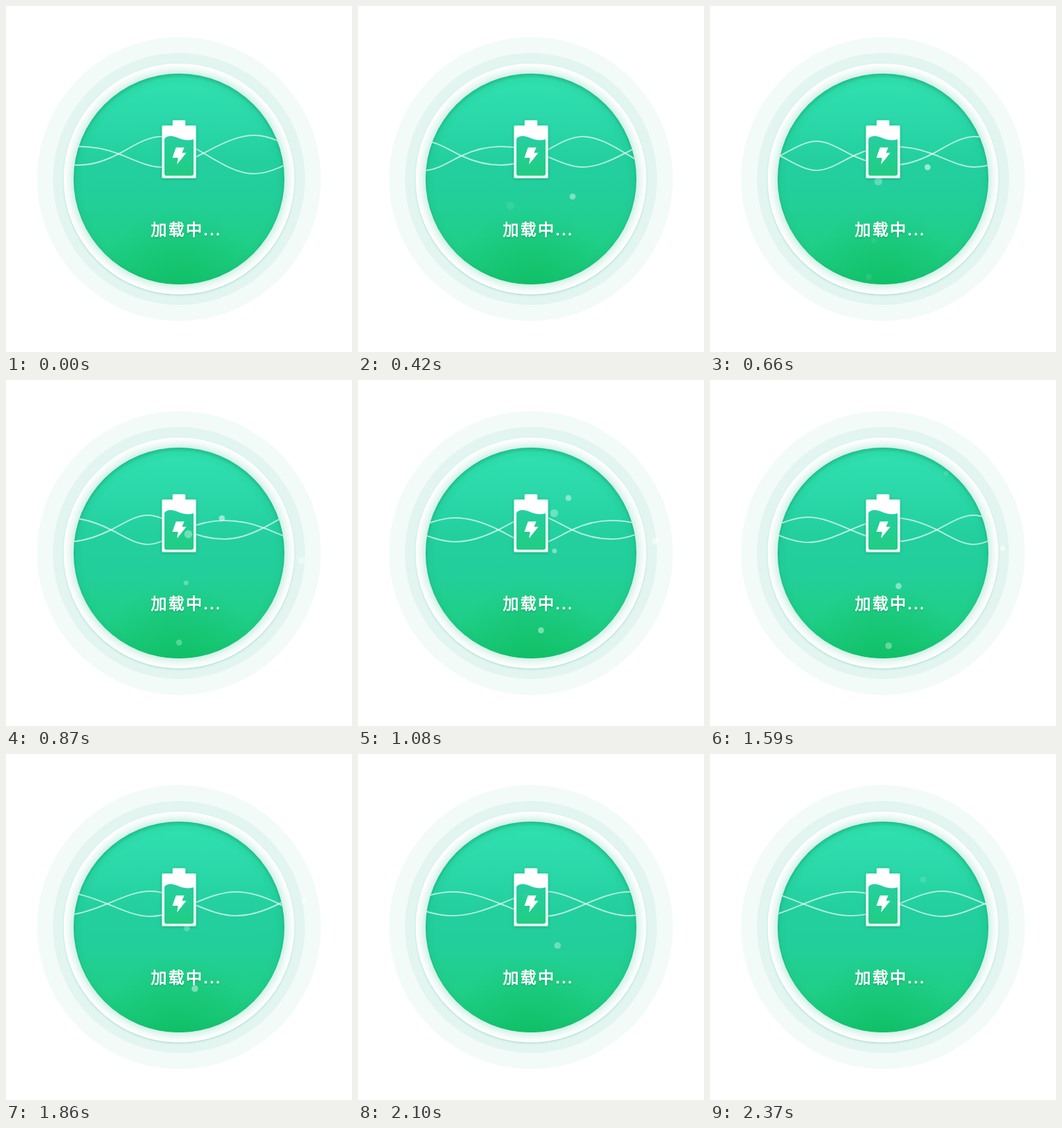
Animation of 522x522 px, one loop 2400 ms. Source, as an HTML page with a canvas:

```html
<!DOCTYPE html>
<html lang="zh">
<head>
<meta charset="utf-8">
<style>
  html, body { margin: 0; width: 100%; height: 100%; overflow: hidden; background: #fff; }
  canvas { display: block; width: 522px; height: 522px; }
</style>
</head>
<body>
<canvas id="stage" width="522" height="522"></canvas>
<script>
const ctx = document.getElementById('stage').getContext('2d');
const LOOP = 2400, STEP = 30, C = 261, R = 159;

// The strands cross at these x; each lobe between has a top and a bottom.
const crossings = [-600, -463, -319, -190, -60, 51, 170, 298, 450];
const tops = [207, 208, 207, 208, 204, 212, 197, 195];
const bottoms = [246, 244, 245, 244, 248, 240, 243, 253];
const strands = [0, 1].map(makeStrand);

// A bubble rises along a quadratic curve and fades in and out.
const bubbles = [
  { r: 4.5, alpha: .55, begin: 30, end: 1500, from: [300, 370], bend: [364, 202], to: [283, 128] },
  { r: 6, alpha: .36, begin: 330, end: 1500, from: [221, 315], to: [338, 137] },
  { r: 3.6, alpha: .42, begin: 600, end: 1680, from: [240, 368], to: [367, 120] },
  { r: 4.6, alpha: .5, begin: 570, end: 2130, from: [228, 413], bend: [332, 383], to: [250, 206] },
  { r: 5, alpha: .42, begin: 1200, end: 2490, from: [252, 420], bend: [276, 436], to: [332, 137] },
  { r: 5.5, alpha: .5, begin: 600, end: 1530, from: [442, 310], to: [455, 180] },
  { r: 4, alpha: .6, begin: 1110, end: 2250, from: [452, 304], bend: [421, 250], to: [478, 170] }
];

function makeStrand(parity) {
  const middle = i => (tops[i] + bottoms[i]) / 2;
  const extrema = tops.map((top, i) => ({
    x: (crossings[i] + crossings[i + 1]) / 2,
    y: i % 2 === parity ? top : bottoms[i],
    slope: 0
  }));
  return extrema.flatMap((a, i) => {
    const b = extrema[i + 1];
    if (!b) return [a, { x: crossings[i + 1], y: middle(i), slope: 1.5 * (middle(i) - a.y) / 76 }];
    return [a, {
      x: crossings[i + 1],
      y: (middle(i) + middle(i + 1)) / 2,
      slope: 1.5 * (b.y - a.y) / (b.x - a.x)
    }];
  });
}

function disc(x, y, r, fill) {
  ctx.fillStyle = fill;
  ctx.beginPath();
  ctx.arc(x, y, r, 0, Math.PI * 2);
  ctx.fill();
}

function gradient(g, ...stops) {
  stops.forEach(([at, color]) => g.addColorStop(at, color));
  return g;
}

function shadow(color, blur, y) {
  ctx.shadowColor = color;
  ctx.shadowBlur = blur;
  ctx.shadowOffsetY = y;
}

function drawDial() {
  ctx.fillStyle = '#fff';
  ctx.fillRect(0, 0, 522, 522);
  disc(C, C, 214, '#f2fbf8');
  disc(C, C, 190, '#e2f5f0');
  ctx.save();
  shadow('rgba(80,195,160,.4)', 3, 1.5);
  disc(C, C, 174, '#fff');
  ctx.restore();
  disc(C, C, 174, gradient(ctx.createRadialGradient(C, C, R, C, C, 174),
    [0, '#d0f0e6'], [.35, '#e6f7f2'], [.75, '#f8fdfb'], [1, '#fff']));
  disc(C, C, R, gradient(ctx.createLinearGradient(0, 102, 0, 420),
    [0, '#31e1b0'], [.2, '#2bd9aa'], [.42, '#23cf9f'], [.58, '#22cf9b'], [.78, '#20cf8a'], [1, '#1acb7a']));
  disc(C, C, R, gradient(ctx.createRadialGradient(C, 430, 0, C, 430, 125),
    [0, 'rgba(14,190,98,.85)'], [.4, 'rgba(14,190,98,.5)'], [1, 'rgba(14,190,98,0)']));
  disc(C, C, R, gradient(ctx.createRadialGradient(C, C + 3, 144, C, C + 3, 162),
    [0, 'rgba(10,160,100,0)'], [.6, 'rgba(10,160,100,.08)'], [1, 'rgba(10,150,100,.5)']));
}

function drawWaves(time) {
  const shift = .249 * time + 2.5e-6 * time * time;
  ctx.save();
  ctx.beginPath();
  ctx.arc(C, C, R, 0, Math.PI * 2);
  ctx.clip();
  ctx.translate(shift, 0);
  ctx.strokeStyle = 'rgba(255,255,255,.65)';
  ctx.lineWidth = 2;
  for (const knots of strands) {
    ctx.beginPath();
    ctx.moveTo(knots[0].x, knots[0].y);
    for (let i = 1; i < knots.length; i++) {
      const a = knots[i - 1], b = knots[i], h = (b.x - a.x) / 3;
      ctx.bezierCurveTo(a.x + h, a.y + a.slope * h, b.x - h, b.y - b.slope * h, b.x, b.y);
    }
    ctx.stroke();
  }
  ctx.restore();
}

function batteryShape(inset, fill) {
  ctx.fillStyle = fill;
  ctx.beginPath();
  ctx.roundRect(251 + inset, 172 + inset, 20 - 2 * inset, 12, 2);
  ctx.roundRect(235 + inset, 180 + inset, 52 - 2 * inset, 80 - 2 * inset, 2);
  ctx.fill();
}

function drawBattery() {
  ctx.save();
  shadow('rgba(8,130,85,.45)', 5, 1);
  batteryShape(0, '#c9f2e3');
  ctx.restore();
  batteryShape(1.5, '#fff');

  const liquid = gradient(ctx.createLinearGradient(0, 196, 0, 256), [0, '#25cfa2'], [1, '#20cd82']);
  ctx.fillStyle = liquid;
  ctx.beginPath();
  ctx.moveTo(239, 201);
  ctx.bezierCurveTo(241, 196, 249, 195, 257, 198);
  ctx.bezierCurveTo(266, 202, 274, 204, 283, 201);
  ctx.lineTo(283, 253);
  ctx.quadraticCurveTo(283, 256, 280, 256);
  ctx.lineTo(242, 256);
  ctx.quadraticCurveTo(239, 256, 239, 253);
  ctx.fill();

  ctx.fillStyle = '#fff';
  ctx.beginPath();
  [[256.5, 213.5], [269, 213.5], [265.5, 221.5], [272, 221.5], [258, 239], [259.5, 229], [251, 229]]
    .forEach(p => ctx.lineTo(...p));
  ctx.closePath();
  ctx.fill();
}

function drawLabel() {
  const label = ['加载中...', 218.5, 345.5];
  ctx.save();
  ctx.font = '500 24px "Noto Sans CJK SC", "Noto Sans CJK", sans-serif';
  ctx.letterSpacing = '2.5px';
  ctx.fillStyle = ctx.strokeStyle = '#fff';
  ctx.lineWidth = .8;
  shadow('rgba(5,125,70,.5)', 3, 2);
  ctx.fillText(...label);
  ctx.shadowColor = 'transparent';
  ctx.strokeText(...label);
  ctx.restore();
}

function drawBubbles(time) {
  for (const { r, alpha, begin, end, from, bend, to } of bubbles) {
    const p = (time - begin) / (end - begin), q = 1 - p;
    if (p <= 0 || p >= 1) continue;
    const [x, y] = from.map((start, i) => {
      const via = bend ? bend[i] : (start + to[i]) / 2;
      return q * q * start + 2 * p * q * via + p * p * to[i];
    });
    disc(x, y, r, `rgba(255,255,255,${alpha * Math.sin(Math.PI * p)})`);
  }
}

function frame(now) {
  const time = Math.floor(now % LOOP / STEP) * STEP;
  drawDial();
  drawWaves(time);
  drawBattery();
  drawLabel();
  drawBubbles(time);
}

const start = performance.now();
(function tick() {
  frame(performance.now() - start);
  requestAnimationFrame(tick);
})();
</script>
</body>
</html>
```
